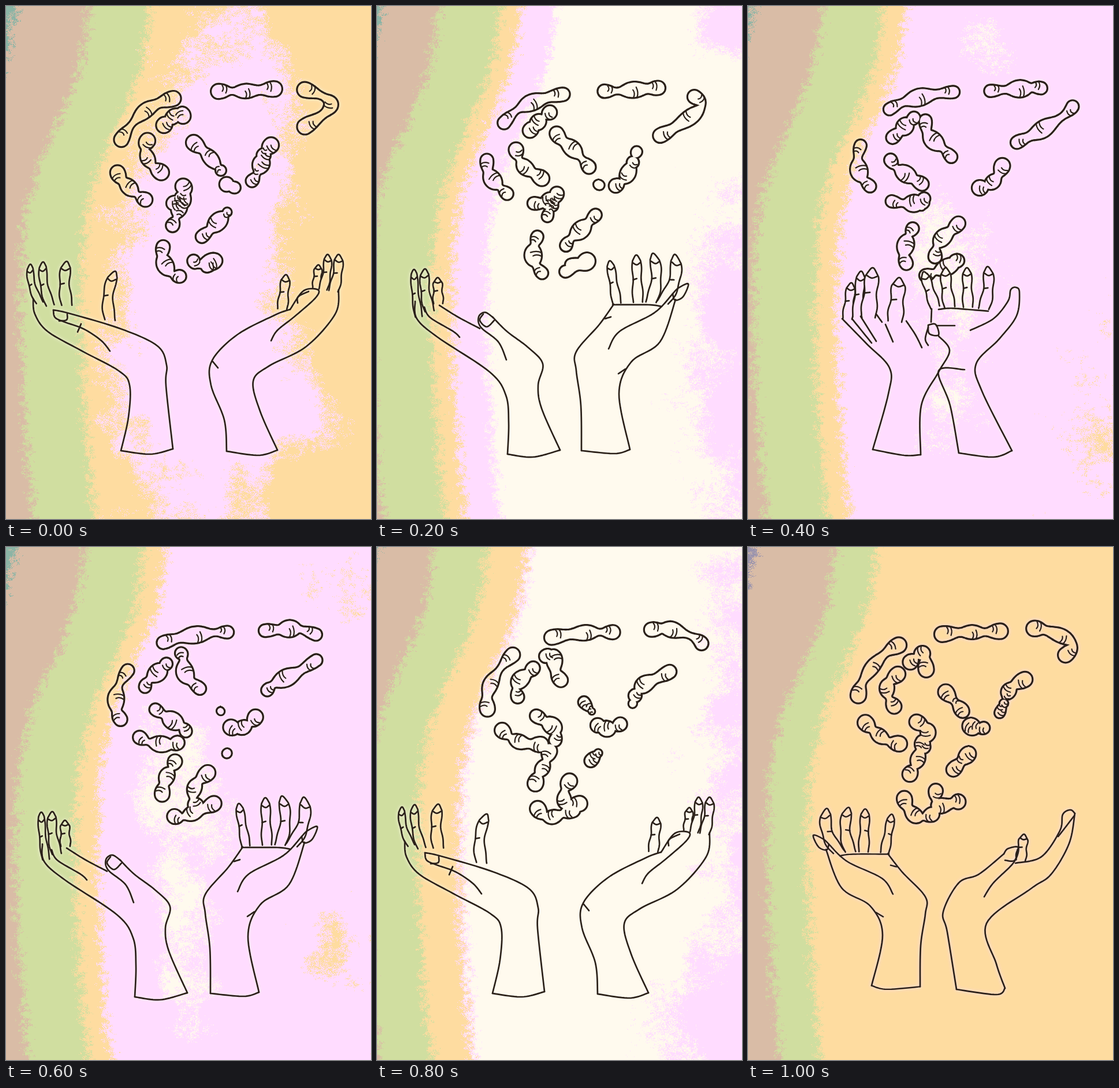
An HTML page with a canvas that plays this animation: 632x886 px, repeating every 1200 ms.

```html
<!DOCTYPE html>
<html>
<head>
<meta charset="utf-8">
<title>Juggling hands</title>
<style>
html, body { margin: 0; width: 100%; height: 100%; overflow: hidden; background: #fddca0; }
canvas { display: block; }
</style>
</head>
<body>
<canvas id="stage" width="632" height="886"></canvas>
<script>
const W = 632, H = 886, STEP = 200, POSES = 6, INK = '#2a2019';
const PALETTE = [[155, 148, 173], [140, 180, 165], [217, 188, 166], [208, 222, 160],
  [254, 220, 160], [255, 220, 255], [255, 250, 238]];

const points = s => s.split(' ').map(p => p.split(',').map(Number));
const layer = () => Object.assign(document.createElement('canvas'), { width: W, height: H });

// Worms crawl along these tracks, one knot every two steps, one worm every six
const TRACKS = [
  { lead: 0, path: '306,332 287,341 245,336 214,314 192,284 197,236 240,182 296,158 362,148 414,147 470,143 512,143 563,170 512,212 462,238 446,258' },
  { lead: .3, path: '443,270 427,301 402,314 382,308' },
  { lead: 1.3, path: '372,284 344,252 312,222 304,184 282,198 266,214 241,240 252,274 284,297 311,317 304,345' },
  { lead: 1.3, path: '383,356 357,383 328,412 328,446 364,440 328,458 293,466 271,436 277,400 292,372 302,340' }
].map(t => ({ lead: t.lead, knots: points(t.path) }));
const REACH = 1.8;

// A hand is a few outline strokes plus fingers: tip, base, bend, half width
const HANDS = {
  cupLeft: {
    lines: '47,505 50,532 72,562 130,595 195,630 214,655 212,710 199,768|199,768 250,774 289,765|289,765 277,656 278,620 262,587 200,558 110,531 82,525|82,525 85,538 102,546 135,558 165,578 180,596|106,532 105,542 92,544|124,563 130,549',
    fingers: '42,446,60,515,6,6 64,442,78,520,5,7 105,441,106,520,4,9 189,458,181,546,8,9'
  },
  cupRight: {
    lines: '576,490 570,532 520,588 455,622 428,648 440,700 470,767|470,767 437,776 382,769|382,769 378,715 355,655 357,612 400,568 465,534 492,524|459,578 470,560 500,536 536,504 540,490 515,492 492,524|524,493 506,502 505,513|358,614 367,625',
    fingers: '541,447,538,488,0,7 557,429,548,492,-3,7 576,429,566,495,-3,8 485,464,478,526,0,8'
  },
  sideLeft: {
    lines: '66,510 69,540 105,572 195,632 223,672 228,720 226,774|226,774 270,779 317,767|317,767 285,695 279,655 287,618 262,590 225,562 200,537|224,611 210,580 180,555 176,537 187,529 201,538|184,532 178,543 190,554 203,543|178,557 140,537 108,517|82,520 92,538 132,562 143,572',
    fingers: '64,455,73,540,2,6 83,454,92,530,4,8 105,469,106,516,0,8'
  },
  palm: {
    lines: '354,768 353,690 345,630 345,597 385,550 410,515|354,768 412,773 438,766|438,766 419,670 440,615 490,580 517,507|512,497 522,487 539,480 530,502 516,508 512,497|512,497 480,530 420,562 401,592|408,516 470,516 493,519|395,540 405,537|418,635 430,627',
    fingers: '403,440,416,517,0,7 449,430,452,515,0,8 478,427,473,515,-8,9 516,429,492,515,-11,10'
  },
  backLeft: {
    lines: '163,540 205,583 245,625 243,670 216,766|216,766 270,776 299,775|299,775 300,690 330,632 349,595 330,570|312,551 325,550 330,568 314,566 312,551|312,555 307,575 312,586|274,544 290,568 301,590|180,540 214,582|195,536 222,579|222,532 232,546|238,550 251,580',
    fingers: '179,478,172,543,0,8 196,458,189,541,0,8 216,452,208,541,0,12 262,469,254,548,0,12'
  },
  palmUp: {
    lines: '330,524 350,522 380,524 416,527|385,560 425,540 450,510 455,490 464,486 470,495 465,535 435,575 395,618 405,665 457,768|457,768 425,779 365,772|365,772 350,690 330,630 375,628|318,523 317,546|326,552 358,552',
    fingers: '304,459,325,523,0,8 342,452,350,523,2,9 379,452,381,523,0,8 415,450,407,526,-5,9'
  },
  sideRight: {
    lines: '566,460 556,512 525,565 490,590 413,650 430,720 445,762|445,762 430,773 361,764|361,764 345,665 338,630 365,580 400,565 443,530|443,530 450,521 468,519 462,541 445,541|467,522 460,545 425,580 409,604|463,546 508,535 540,490 545,462 558,454 566,460|565,464 545,490 537,500',
    fingers: '478,496,472,543,0,8'
  }
};

// bands: offsets of the colour edges; glow: soft spots [x, y, rx, ry, strength]
const SCENES = [
  { bands: [0, 105], corner: 20, main: 4.25, glow: [[330, 560, 185, 480, 1.35], [410, 150, 110, 200, .6], [520, 700, 110, 90, .5]],
    hands: [['cupLeft'], ['cupRight']] },
  { bands: [-38, 70, 105, 165], corner: 11, main: 6.5, glow: [[640, 600, 120, 330, -.85], [620, 30, 80, 60, -.8]],
    hands: [['sideLeft'], ['palm']] },
  { bands: [-16, 90, 128], corner: 10, main: 5.4, glow: [[340, 440, 110, 170, .65], [350, 700, 80, 130, .5], [420, 60, 70, 80, .5], [620, 720, 70, 160, -.35]],
    hands: [['backLeft'], ['palmUp']] },
  { bands: [-9, 95, 133], corner: 17, main: 5.4, glow: [[300, 420, 110, 190, .75], [310, 720, 70, 150, .7], [590, 70, 60, 70, -.4], [570, 690, 60, 80, -.4]],
    hands: [['sideLeft', -3, 3], ['palm', 0, 3]] },
  { bands: [-45, 46, 115, 124], corner: 0, main: 6.5, glow: [[640, 300, 110, 600, -.7], [590, 820, 120, 110, -.7]],
    hands: [['cupLeft', 1, 3], ['cupRight', 0, 3]] },
  { bands: [8, 78], corner: 14, tone: 0, main: 4.5, glow: [],
    hands: [['palm', 652, 62, -1, .908], ['sideRight']] }
];

// Seeded value noise
let seed = 7;
const grid = Float32Array.from({ length: 65536 }, () => {
  seed = (Math.imul(seed, 1664525) + 1013904223) >>> 0;
  return seed / 4294967296;
});
const cell = (x, y) => grid[(x * 157 + y * 7919) & 65535];
const mix = (a, b, t) => a + (b - a) * t;
const ease = t => t * t * (3 - 2 * t);
function noise(x, y) {
  const i = Math.floor(x), j = Math.floor(y), u = ease(x - i);
  return mix(mix(cell(i, j), cell(i + 1, j), u), mix(cell(i, j + 1), cell(i + 1, j + 1), u), ease(y - j));
}

const edge = y => 20 + 130 / (1 + Math.exp((y - 210) / 70)) + 28 * (y / H) ** 4;

function paintGround(g, scene, shift) {
  const img = g.createImageData(W, H), { bands, corner, glow, tone = 1 } = scene;
  for (let y = 0, k = 0; y < H; y++) {
    const base = edge(y);
    for (let x = 0; x < W; x++, k += 4) {
      const fine = noise(x / 7 + shift, y / 5) - .5;
      const grain = grid[(x * 631 + y * 2477 + (x * y) % 911) & 65535] - .5;
      const wx = x + 22 * fine + 18 * grain;
      let n = 0;
      while (n < bands.length && wx > base + bands[n]) n++;
      let level = 2 + n;
      if (n === bands.length) {
        let v = scene.main + .4 * (noise(x / 40 + shift, y / 40) - .5) + .25 * fine + .3 * grain;
        for (const [cx, cy, rx, ry, amp] of glow) v += amp * Math.exp(-(((x - cx) / rx) ** 2) - ((y - cy) / ry) ** 2);
        level = Math.max(4, Math.min(6, Math.floor(v)));
      } else if (wx + y / 4 < corner) level = tone;
      img.data.set(PALETTE[level], k);
      img.data[k + 3] = 255;
    }
  }
  g.putImageData(img, 0, 0);
}

// Smooth curve through knots at position s
function along(knots, s) {
  const i = Math.max(0, Math.min(knots.length - 2, Math.floor(s))), t = s - i;
  const at = j => knots[Math.max(0, Math.min(knots.length - 1, j))];
  const a = at(i - 1), b = at(i), c = at(i + 1), d = at(i + 2);
  return [0, 1].map(k => b[k] + .5 * t * (c[k] - a[k] +
    t * (2 * a[k] - 5 * b[k] + 4 * c[k] - d[k] + t * (3 * (b[k] - c[k]) + d[k] - a[k]))));
}

function trace(g, list) {
  g.beginPath();
  list.forEach(p => g.lineTo(...p));
}

function curve(g, knots) {
  const n = (knots.length - 1) * 12;
  trace(g, Array.from({ length: n + 1 }, (_, i) => along(knots, i / 12)));
  g.stroke();
}

function erase(g, draw) {
  g.globalCompositeOperation = 'destination-out';
  draw();
  g.globalCompositeOperation = 'source-over';
}

function finger(g, [tx, ty, bx, by, bend, half]) {
  const len = Math.hypot(bx - tx, by - ty), nx = (ty - by) / len, ny = (bx - tx) / len;
  const side = (t, s) => {
    const off = 4 * bend * t * (1 - t);
    const round = Math.sqrt(Math.min(1, t * len / half * .8));
    const w = s * half * round * (.85 + .25 * t - .12 * Math.cos(4 * Math.PI * t));
    return [mix(tx, bx, t) + nx * (off + w), mix(ty, by, t) + ny * (off + w)];
  };
  const left = [], right = [];
  for (let t = 0; t <= 1; t += .02) {
    left.unshift(side(t * t, 1));
    right.push(side(t * t, -1));
  }
  trace(g, left.concat(right));
  erase(g, () => g.fill());
  g.stroke();
  curve(g, [side(.16, .8), side(.2, 0), side(.16, -.8)]);
  curve(g, [side(.5, 1), side(.48, .1)]);
}

function hand(g, [name, dx = 0, dy = 0, sx = 1, sy = 1]) {
  const { lines, fingers } = HANDS[name];
  g.save();
  g.translate(dx, dy);
  g.scale(sx, sy);
  points(fingers).forEach(f => finger(g, f));
  lines.split('|').forEach(l => curve(g, points(l)));
  g.restore();
}

// Every worm on a track at one step, as a row of lumpy discs
function wormsAt(step) {
  const worms = [];
  TRACKS.forEach(({ lead, knots }, n) => {
    const end = 2 * (knots.length - 1);
    for (let p = lead + step - POSES; p < end + REACH; p += POSES) {
      const from = Math.max(0, p - REACH), to = Math.min(end, p + REACH), part = (to - from) / (2 * REACH);
      if (part <= 0) continue;
      const size = Math.min(1, .6 + .8 * part), discs = [];
      for (let i = 0; i <= 60; i++) {
        const u = mix(from, to, i / 60), q = (u - p) / REACH;
        const lump = 10.8 + 3 * Math.cos(2 * Math.PI * q) - 1.6 * q * q + 1.5 * Math.sin(3 * q + p + 2 * n);
        discs.push([...along(knots, u / 2), lump * size]);
      }
      worms.push(discs);
    }
  });
  return worms;
}

function fillDiscs(g, list, grow) {
  g.beginPath();
  for (const [x, y, r] of list) {
    g.moveTo(x + r + grow, y);
    g.arc(x, y, r + grow, 0, 7);
  }
  g.fill();
}

// Pairs of short folds near both ends and the middle
function folds(g, discs) {
  const [first, last] = [discs[0], discs[60]];
  if (Math.hypot(last[0] - first[0], last[1] - first[1]) < 18) return;
  [6, 32, 54].forEach((m, k) => {
    const [x, y, r] = discs[m], a = discs[m - 3], b = discs[m + 3], side = k % 2 ? 1 : -1;
    g.save();
    g.translate(x, y);
    g.rotate(Math.atan2(b[1] - a[1], b[0] - a[0]));
    for (const o of [-3, 3]) {
      g.beginPath();
      g.moveTo(o, side * r * .95);
      g.quadraticCurveTo(o + 4, side * r * .4, o, -side * r * (o > 0 ? .3 : 0));
      g.stroke();
    }
    g.restore();
  });
}

function build(scene, step) {
  const page = layer(), ink = layer(), g = page.getContext('2d'), pen = ink.getContext('2d');
  paintGround(g, scene, step * 17.3);
  pen.strokeStyle = pen.fillStyle = INK;
  pen.lineCap = pen.lineJoin = 'round';
  const worms = wormsAt(step), all = worms.flat();
  fillDiscs(pen, all, 1.6);
  erase(pen, () => fillDiscs(pen, all, -1.6));
  pen.lineWidth = 2.2;
  worms.forEach(w => folds(pen, w));
  pen.lineWidth = 2.7;
  scene.hands.forEach(h => hand(pen, h));
  g.shadowColor = scene.bands.length === 2 && !scene.glow.length ? '#ffdcff' : '#fffaee';
  g.shadowBlur = 6;
  g.drawImage(ink, 0, 0);
  return page;
}

const pages = SCENES.map(build);
const view = document.getElementById('stage').getContext('2d');
const start = performance.now();
let shown = -1;

function tick() {
  const i = Math.floor((performance.now() - start) / STEP) % POSES;
  if (i !== shown) view.drawImage(pages[shown = i], 0, 0);
  requestAnimationFrame(tick);
}
tick();
</script>
</body>
</html>
```
